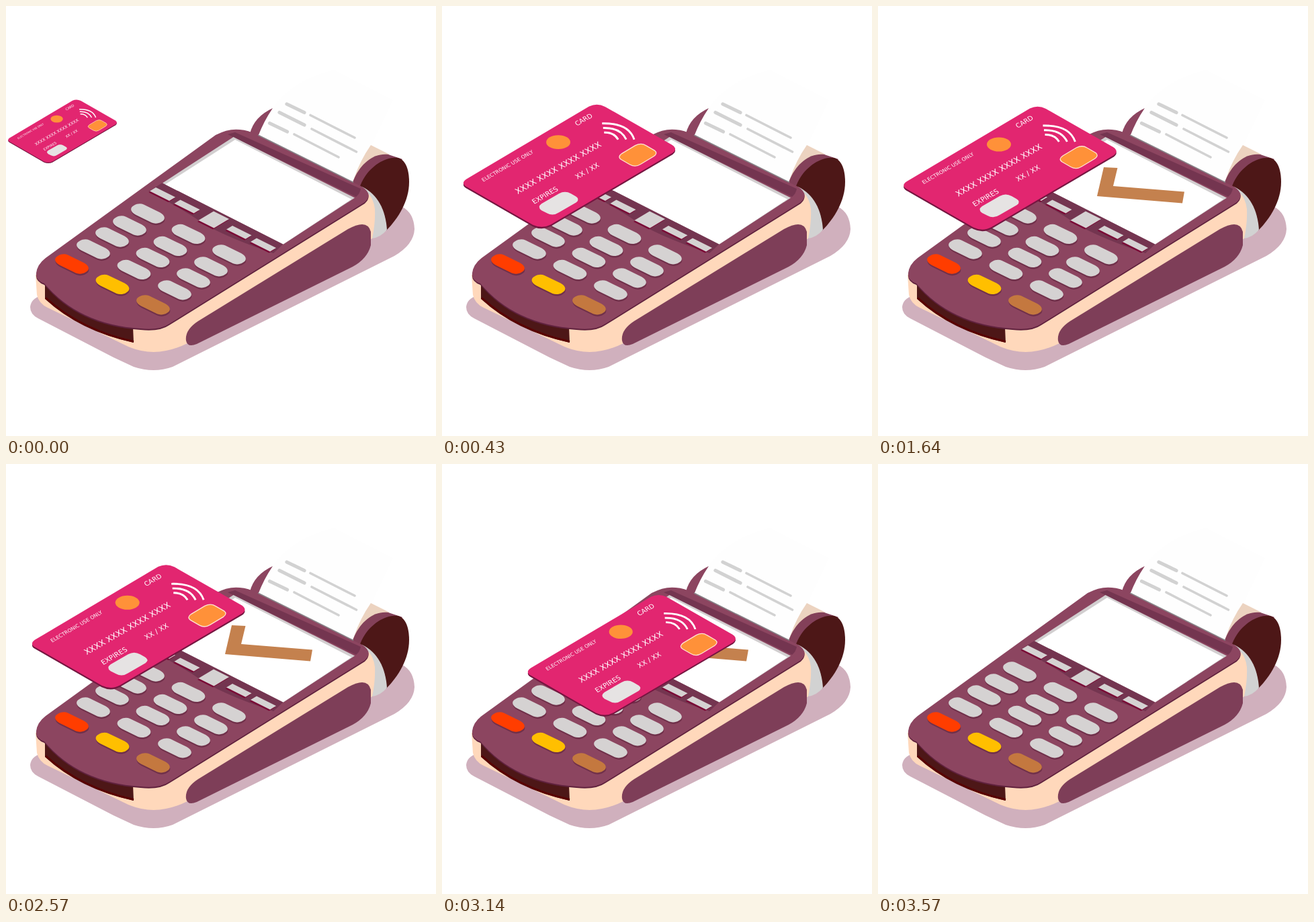
An HTML page for the animation above (5000 ms loop, 640 by 640 pixels).

```html
<!DOCTYPE html>
<html lang="en">
<head>
<meta charset="utf-8">
<title>Card payment</title>
<style>
  html, body { margin: 0; width: 100%; height: 100%; overflow: hidden; background: #fff; }
  svg { display: block; width: 100vw; height: 100vh; }
  text { font-family: "DejaVu Sans", sans-serif; fill: #fff; }
</style>
</head>
<body>
<svg viewBox="0 0 640 640">
  <defs>
    <clipPath id="tickShape"><path d="M336 240 L356.5 241 L350 268 L456 276.500 L453 293.500 L326 283 Z"/></clipPath>
    <path id="key" d="M-6 -13.500 L18 -1.800 C26 2.500 27.500 9 20 12.500 C16 15 10 15.300 6 13.500 L-18 1.800 C-26 -2.500 -27.500 -9 -20 -12.500 C-16 -15 -10 -15.300 -6 -13.500 Z"/>
    <path id="plate" d="M226 152.500 Q238 147 250 153 L350 210 Q359 216 351 222 L169 329 Q156 336 142 329.500 L42 272 Q34 267 43 261 Z"/>
  </defs>

  <!-- ground shadow -->
  <path fill="#d0b0bd" d="M36 448 Q37 436 52 431 L560 298 L590 299 Q607 308 608 332 Q607 355 578 372 L248 537 Q220 547 190 537 L160 523 L48 465 Q36 459 36 448 Z"/>

  <!-- paper and roll -->
  <path fill="#8c4560" d="M363 190 Q369 165 397 152 L386 196 Z"/>
  <path fill="#fefefe" d="M375.500 193 Q384 171 397 152 Q425 110 488 95 L576 140 L544 207 Q527 235 517 263 Z"/>
  <g stroke="#d2d2d2" stroke-linecap="round">
    <path stroke-width="5.200" d="M418 146 L444 158.500 M407 158.500 L444 177 M392.500 174.500 L418.500 187"/>
    <path stroke-width="3.600" d="M453 162.500 L519 196 M455 183 L521.500 217 M429 191 L495 225"/>
  </g>
  <path fill="#ecd3c0" d="M516 263 Q525 233 543 207 L571 221 Q540 230 522 265 Z"/>
  <path fill="#834059" d="M515 265 C524 238 545 218 569 221 L590 228 L545 278 Z"/>
  <path fill="#4d1717" d="M526 271 C534 245 560 224 583 226 C596 229 600 246 600 262 C600 290 584 316 566 334 Z"/>
  <path fill="#d2d2d2" d="M530 269 C553 280 565 303 567 333 Q557 345 544 346 Z"/>

  <!-- body -->
  <path fill="#ffd8bb" d="M44 400 L46 430 Q49 443 62 449 L182 507 Q224 525 270 502 L545 346 Q550 322 549 302 Q547 286 538 278 L300 350 Z"/>
  <path fill="#7e3e58" d="M268 498 Q266 482 286 469 L509 332 Q538 316 543 336 L543 356 Q538 376 516 388 L284 503 Q270 509 268 498 Z"/>
  <path fill="#4d1717" d="M58 412 Q105 455 189 478 L190 501 Q110 484 58 436 Z"/>
  <path fill="none" stroke="#5a0000" stroke-width="3" d="M59 434.500 Q111 482 190 499.500"/>
  <path id="lip" fill="#5f213d" transform="translate(0 2)"/>
  <path id="face" fill="#8c4560" d="M45 398 Q46 385 59 375 L312 192 Q331 182 348 184 Q361 185 372 191 L530 269 Q547 280 534 292 L243 473 Q229 483 200 480 Q108 474 57 413 Q44 408 45 398 Z"/>
  <path fill="#743550" d="M330 191 L341 188 L528 272 Q527 279 521 284 L338 195 Z"/>
  <path stroke="#858085" stroke-width="1.600" d="M375 192 L517 262.500"/>

  <!-- screen -->
  <path fill="#743550" d="M233 263 L413 354 L398 368 Q338 348 297 326 Q260 300 212 276 Z"/>
  <path fill="#d2cfd0" d="M338.500 195 L519 285.500 L413 354.500 L233 263.500 Z"/>
  <path fill="#fff" d="M341 199 L514 287.500 L412.500 354.500 L237 265.500 Z"/>
  <g id="menu"></g>
  <g id="keys"></g>

  <path id="tick" clip-path="url(#tickShape)" pathLength="1" fill="none" stroke="#c4814e" stroke-width="27"
        stroke-dasharray="1 2" stroke-miterlimit="8" d="M346.500 236 L346 246 L338 275.500 L457 285.300"/>

  <g id="card">
    <use href="#plate" y="2.500" fill="#751540"/>
    <use href="#plate" fill="#e22670"/>
    <ellipse cx="180" cy="206" rx="18" ry="10.500" fill="#ff9139"/>
    <g fill="none" stroke="#fff" stroke-width="2.900">
      <path d="M245.500 178 Q285 177 293.500 202"/>
      <path d="M247 184.800 Q273 184 281.500 202"/>
      <path d="M248.500 191.500 Q263 191 269.500 202"/>
    </g>
    <path fill="#ff9139" stroke="#ffe3d2" stroke-width="1.300" d="M295 211 Q304 206.500 311 211 L324 218.500 Q329 222.500 323 227 L303 239 Q295 244 287 239.500 L274 232 Q268 228 275 223 Z"/>
    <path fill="#e6e3e3" d="M155 298 L181 283 Q190 278 199 283 L206 287 Q213 291 207 296 L181 311 Q172 317 163 312 L155 308 Q148 303 155 298 Z"/>
    <g id="labels"></g>
  </g>
</svg>
<script>
  const LOOP = 5000, FPS = 14;
  const $ = id => document.getElementById(id);

  function add(parent, tag, attrs, content) {
    const el = document.createElementNS("http://www.w3.org/2000/svg", tag);
    for (const name in attrs) el.setAttribute(name, attrs[name]);
    if (content) el.textContent = content;
    $(parent).appendChild(el);
  }

  $("lip").setAttribute("d", $("face").getAttribute("d"));

  function menuButton(x, y, w, depth) {
    const rise = w * 0.5, drop = depth * 0.6;
    const shape = `M${x} ${y} l${w} ${rise} l${-depth} ${drop} l${-w} ${-rise} Z`;
    add("menu", "path", { d: shape, fill: "#7a0b36", transform: "translate(-1.500 2)" });
    add("menu", "path", { d: shape, fill: "#d5d2d2" });
  }
  menuButton(223, 270, 29, 9);
  menuButton(259.5, 288.5, 29, 9);
  menuButton(309, 305.5, 23, 22.5);
  menuButton(337, 327, 28.5, 9);
  menuButton(373, 345.5, 29, 9);

  const rows = [[0, 0], [-27, 18], [-53, 35], [-81, 53], [-113, 75]];
  const lastRow = ["#ff3d00", "#ffbf00", "#c4783f"];
  rows.forEach(([dx, dy], row) => {
    for (let col = 0; col < 3; col++) {
      const x = 211 + col * 60.5 + dx, y = 309 + col * 30.4 + dy;
      add("keys", "use", { href: "#key", x: x + 0.5, y: y + 2.5, fill: "#70304a" });
      add("keys", "use", { href: "#key", x, y, fill: row === 4 ? lastRow[col] : "#d5d2d2" });
    }
  });

  function label(x, y, size, words) {
    add("labels", "text", {
      transform: `translate(${x} ${y}) rotate(-30) skewX(8)`, "font-size": size
    }, words);
  }
  label(208, 182, 9.8, "CARD");
  label(68, 265.3, 7.55, "ELECTRONIC USE ONLY");
  label(119.5, 284, 12.2, "XXXX XXXX XXXX XXXX");
  label(208.5, 261.5, 10.5, "XX / XX");
  label(144, 298.8, 10.2, "EXPIRES");

  const clamp = v => Math.min(1, Math.max(0, v));

  function cardPose(t) {
    if (t < 2500) {
      const left = 2 ** (-t / 107);
      return { x: 196.5 - 112.5 * left, y: 243 - 56 * left, scale: 1 - 0.489 * 2 ** (-t / 62) };
    }
    const away = 85 * ((t - 2500) / 640) ** 2.2;
    return { x: 196.5 + away, y: 243 + away / 2, scale: 1 - clamp((t - 3000) / 500) ** 3 };
  }

  function draw(t) {
    const { x, y, scale } = cardPose(t);
    $("card").style.display = scale > 0.001 ? "" : "none";
    $("card").setAttribute("transform", `translate(${x} ${y}) scale(${scale}) translate(-196.500 -243)`);

    const drawn = clamp((t - 755) / 885);
    $("tick").style.display = drawn > 0 && t < 3570 ? "" : "none";
    $("tick").setAttribute("stroke-dashoffset", 1 - drawn);
  }

  // The motion advances in steps of 1/14 second.
  const start = performance.now();
  function tick() {
    const t = (performance.now() - start) % LOOP;
    draw(Math.floor((t + 4.5) * FPS / 1000) * 1000 / FPS % LOOP);
    requestAnimationFrame(tick);
  }
  tick();
</script>
</body>
</html>
```
